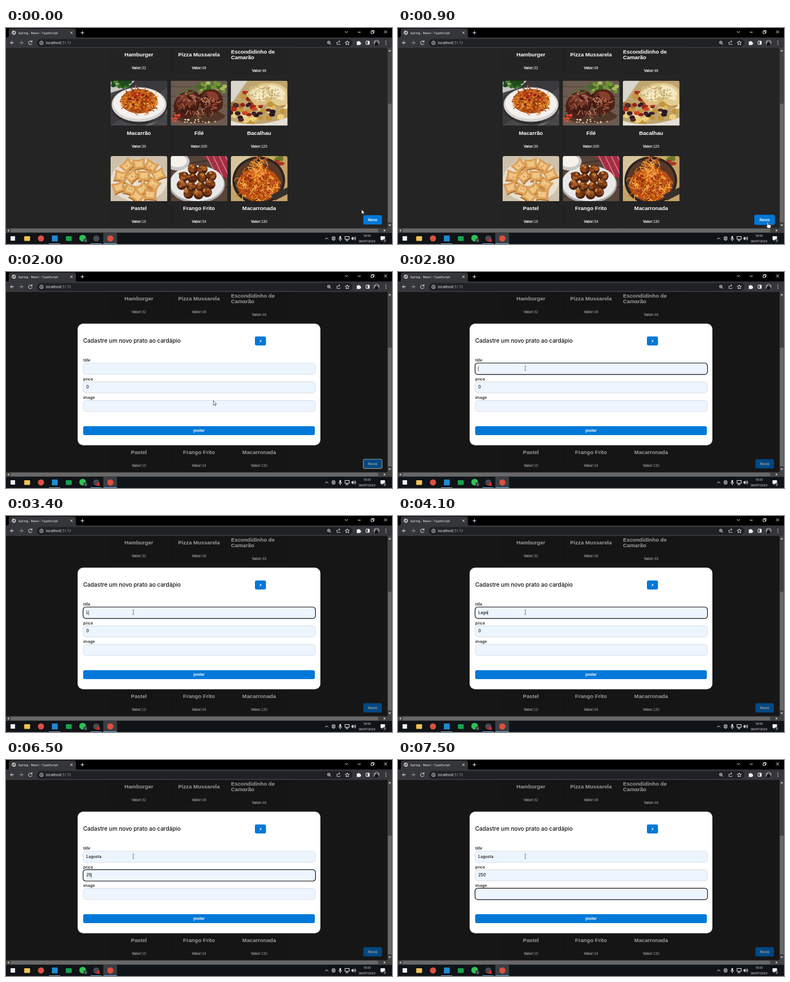
An HTML page for the animation above (8 s loop, 690 px wide and 388 px high).

```html
<!DOCTYPE html>
<html lang="pt-BR">
<head>
<meta charset="utf-8">
<title>Cardápio</title>
<style>
  html, body { margin: 0; width: 100%; height: 100%; overflow: hidden; background: #242424; }
  svg { display: block; width: 100%; height: 100%; }
  text { font-family: "Liberation Sans", Arial, sans-serif; white-space: pre; }
  .ui { font-family: "Open Sans", "Noto Sans", sans-serif; font-weight: 500; }
  .form { font-family: Inter, sans-serif; font-weight: 500; fill: #111; }
  .bold { font-weight: 700; }
  .line { fill: none; stroke: #ececee; stroke-width: 1; }
</style>
</head>
<body>
<svg id="stage" viewBox="0 0 690 388"></svg>
<script>
const LOOP = 8000, STEP = 100;
const BLUE = '#0078d9';

// --- markup helpers ---
const rect = (x, y, w, h, fill, r = 0, more = '') =>
  `<rect x="${x}" y="${y}" width="${w}" height="${h}" rx="${r}" fill="${fill}" ${more}/>`;
const oval = (x, y, rx, ry, fill, more = '') =>
  `<ellipse cx="${x}" cy="${y}" rx="${rx}" ry="${ry}" fill="${fill}" ${more}/>`;
const dot = (x, y, r, fill, more) => oval(x, y, r, r, fill, more);
const path = (d, fill, more = '') => `<path d="${d}" fill="${fill}" ${more}/>`;
const line = (d, more = '') => `<path class="line" d="${d}" ${more}/>`;
const text = (x, y, size, str, more = '') =>
  `<text x="${x}" y="${y}" font-size="${size}" ${more}>${str}</text>`;
const group = (id, body, more = '') => `<g id="${id}" ${more}>${body}</g>`;
const MID = 'text-anchor="middle"';

// --- food pictures, 101.5 x 81 each ---
function seeded(seed) {
  return () => (seed = (seed * 16807) % 2147483647) / 2147483647;
}
function scatter(seed, count, [cx, cy, rx, ry], draw) {
  const rnd = seeded(seed * 7919 + 13);
  let out = '';
  for (let i = 0; i < count; i++) {
    const a = rnd() * Math.PI * 2, d = Math.sqrt(rnd());
    out += draw(cx + Math.cos(a) * rx * d, cy + Math.sin(a) * ry * d, rnd);
  }
  return out;
}
const pick = (list, rnd) => list[Math.floor(rnd() * list.length)];
const n1 = v => v.toFixed(1);
const blobs = (seed, count, area, size, colors) => scatter(seed, count, area, (x, y, rnd) =>
  oval(n1(x), n1(y), n1(size * (.75 + rnd() * .5)), n1(size * (.6 + rnd() * .4)), pick(colors, rnd)));
const noodles = (seed, count, area, colors) => scatter(seed, count, area, (x, y, rnd) => {
  const v = () => n1(rnd() * 20 - 10);
  return path(`M${n1(x)} ${n1(y)}q${v()} ${v()} ${v()} ${v()}`, 'none',
    `stroke="${pick(colors, rnd)}" stroke-width="1.5" stroke-linecap="round"`);
});
const PASTA = ['#d8761f', '#e99a3b', '#a8440f', '#f0b45c', '#c95e1b', '#84300c'];
const nugget = (x, y, i) => dot(x + 1, y + 2, 9, '#4a2210') +
  blobs(40 + i, 9, [x, y, 6, 5], 4, ['#7d3d16', '#92491a', '#a55a23', '#683012']) +
  blobs(60 + i, 4, [x - 1, y - 3, 5, 3], 2, ['#c5803f', '#b56d2f']);
const pastry = (x, y, i) => `<g transform="translate(${x} ${y}) rotate(${i * 37 % 90 - 40})">` +
  path('M-12-9Q0-6 11-11Q9 0 13 10Q0 8-10 12Q-9 1-12-9Z', '#a8682c') +
  path('M-12-10Q0-7 11-12Q9-1 12 8Q0 6-10 10Q-9 0-12-10Z', '#dca056') +
  path('M-8-6Q0-4 7-7Q6 0 7 4Q0 3-6 5Z', '#efc684') + '</g>';

const photos = {
  macarrao: () => rect(0, 0, 102, 81, '#48474a') +
    path('M0 30L40 0H102V12L0 81Z', '#3a393c') + path('M62 81L102 50V58L72 81Z', '#6b6865') +
    path('M0 0H44L30 13 0 22Z', '#c9c9c6') +
    blobs(3, 26, [19, 5, 18, 7], 4, ['#2f6b25', '#4d8a2f', '#1e4a1c']) +
    oval(52, 47, 50, 32, '#1e1d20', 'opacity=".6"') + oval(51, 43, 49, 31, '#d5d3d2') +
    oval(51, 41, 46, 28, '#f3f0ed') + oval(51, 37, 33, 22, '#b5531a') +
    noodles(5, 190, [51, 36, 31, 20], PASTA) + blobs(8, 19, [52, 32, 20, 13], 2.5, ['#a51f10', '#c5361b', '#7c1f0d']),

  file: () => rect(0, 0, 102, 81, '#6b5b50') +
    [10, 27, 44, 61].map(y => rect(0, y, 102, 2, '#5d4b40')).join('') +
    blobs(4, 38, [73, 14, 25, 12], 4, ['#6d9234', '#8fab46', '#40661f', '#a6b85d']) +
    oval(50, 64, 47, 12, '#503628') +
    path('M5 45Q10 22 34 17Q48 16 52 32Q54 60 30 70Q7 68 5 45Z', '#4a2018') +
    path('M10 40Q18 21 36 20Q48 25 46 37Q37 50 13 52Z', '#7c3a2a') +
    path('M49 28Q62 12 82 17Q98 28 92 49Q75 63 58 58Z', '#4f2219') +
    path('M54 28Q67 15 81 22Q91 33 84 43Q67 50 57 45Z', '#85402d') +
    noodles(9, 85, [48, 42, 38, 20], ['#31130e', '#6b2d20', '#ac674d', '#4a1a12', '#c28467']) +
    path('M15 24Q38 13 53 5M31 24Q49 15 71 9', 'none', 'stroke="#4d702f" stroke-width="2"') +
    blobs(2, 8, [10, 68, 9, 7], 2.5, ['#c21f1b', '#e44a2f']) +
    blobs(7, 20, [48, 73, 40, 4], 1.5, ['#cfb17c', '#a31d17', '#e5d6b8']),

  bacalhau: () => rect(0, 0, 102, 81, '#bea571') +
    path('M0 0H30L8 32 0 43Z', '#d9d6ce') +
    blobs(2, 55, [51, 50, 51, 28], 6, ['#dfb962', '#edcf7d', '#c3943e', '#aa6e27', '#efe0b5']) +
    blobs(6, 17, [40, 54, 43, 22], 4.5, ['#381f29', '#4d2930', '#271b20']) +
    blobs(12, 14, [30, 40, 30, 25], 4.5, ['#b32a19', '#d04623', '#962018']) +
    path('M27 25Q42 5 65 4L75 33Q59 48 42 43Z', '#dcc384') + path('M31 24Q47 10 63 8L68 28 46 37Z', '#f3e3bb') +
    path('M62 6Q84 0 100 16L101 42Q84 51 73 37Z', '#e3cd94') + path('M67 8Q88 7 97 22L94 36 77 31Z', '#f5e8c3') +
    noodles(16, 28, [63, 24, 31, 14], ['#ddc792', '#fff4d7', '#c7a968']) +
    blobs(15, 24, [57, 22, 30, 15], 1, ['#66782e', '#93904e']) +
    path('M0 72Q45 87 102 66V81H0Z', '#e5e0d8'),

  pastel: () => rect(0, 0, 102, 81, '#cfc2ad') + oval(51, 44, 50, 39, '#e8dfcf') +
    [[30, 18], [51, 15], [72, 19], [86, 34], [18, 37], [39, 37], [60, 36], [76, 51], [15, 57], [35, 61], [57, 60], [71, 70], [47, 73]]
      .map(([x, y], i) => pastry(x, y, i)).join('') +
    blobs(31, 45, [51, 43, 37, 32], 1.2, ['#f4d59b', '#bc7935', '#cf8c40']),

  frango: () => rect(0, 0, 102, 81, '#594439') +
    [18, 36, 54, 72].map(y => path(`M0 ${y}L102 ${y - 17}v2L0 ${y + 2}Z`, '#3e3029')).join('') +
    path('M58 0H102V40Q83 37 72 14Z', '#a72d43') +
    [65, 76, 87, 98].map(x => path(`M${x} 0l17 36`, 'none', 'stroke="#ce8e9a" stroke-width="1.5"')).join('') +
    oval(47, 51, 50, 34, '#aaa8aa') + oval(47, 49, 48, 32, '#e9e8e8') +
    oval(12, 10, 22, 16, '#c9c7c5') + oval(12, 9, 17, 11, '#f6f2eb') +
    [[39, 22], [56, 22], [23, 35], [72, 34], [38, 38], [55, 37], [19, 50], [70, 49], [36, 54], [53, 53], [31, 66], [49, 67], [64, 63]]
      .map(([x, y], i) => nugget(x, y, i)).join(''),

  macarronada: () => rect(0, 0, 102, 81, '#c5a368') + path('M0 0H35L12 38 0 55Z', '#d9c59c') +
    blobs(4, 9, [85, 9, 17, 10], 5, ['#6d7728', '#c9b155', '#ac3720']) +
    oval(50, 44, 47, 43, '#282320') + oval(50, 44, 43, 39, '#5b3827') + oval(50, 51, 38, 30, '#b74910') +
    noodles(14, 190, [49, 53, 37, 28], [...PASTA, '#f4a12f']) +
    blobs(19, 16, [48, 56, 31, 22], 2, ['#a92910', '#c93c15']) +
    path('M47 0H55L54 20Q48 25 46 17Z', '#35251e') +
    noodles(23, 85, [49, 25, 13, 22], ['#f09334', '#d8661c', '#f4ab4b', '#a8410f']) +
    path('M72 70L102 56V68L79 80Z', '#36302c'),
};

// --- page ---
const columns = [237.5, 345, 452.5], rows = [-46.5, 94.5, 230];
const dishes = [
  ['Hamburger', 32], ['Pizza Mussarela', 48], ['Escondidinho de|Camarão', 48],
  ['Macarrão', 30, 'macarrao'], ['Filé', 100, 'file'], ['Bacalhau', 120, 'bacalhau'],
  ['Pastel', 10, 'pastel'], ['Frango Frito', 34, 'frango'], ['Macarronada', 130, 'macarronada'],
];
function card([name, price, photo], i) {
  const cx = columns[i % 3], left = cx - 50.7, top = rows[Math.floor(i / 3)];
  const [first, second] = name.split('|');
  const title = second
    ? text(left + .5, top + 92.5, 9.7, first, 'class="bold"') + text(left + .5, top + 102, 9.7, second, 'class="bold"')
    : text(cx, top + 97, 9.7, name, `class="bold" ${MID}`);
  return rect(left, top, 101.5, 128, '#232323', 4, 'stroke="#202020" stroke-opacity=".5" stroke-width="1.5"') +
    (photo ? `<g transform="translate(${left} ${top})" clip-path="url(#frame)"><g filter="url(#soft)">${photos[photo]()}</g></g>` : '') +
    title + text(cx, top + (second ? 125.3 : 120.3), 6.6, `<tspan class="bold">Valor:</tspan>${price}`, MID);
}
const page = rect(0, 36, 682, 324, '#242424') +
  `<g fill="#fff" clip-path="url(#view)">${dishes.map(card).join('')}</g>` +
  group('add', rect(-16.7, -8.3, 33.4, 16.6, BLUE, 3) +
    rect(-16.7, -8.3, 33.4, 16.6, 'none', 3, 'id="addRing" stroke="#fff" stroke-width="1.1"') +
    text(0, 2.4, 6.7, 'Novo', `class="bold" fill="#fff" ${MID}`));

// --- form ---
const fields = [['title', 163.8], ['price', 197.2], ['image', 230.6]];
const field = ([name, y]) =>
  text(138, y - 2.7, 7.18, name, 'class="form"') +
  rect(138, y, 415, 20, '#edf5fe', 5, 'stroke="#cfd5dc" stroke-width=".8"') +
  rect(137.7, y - .3, 415.6, 20.6, 'none', 5, `id="ring-${name}" stroke="#15171c" stroke-width="1.2"`) +
  (name === 'price' ? rect(143, 202, 5, 10, '#2a7be0', 0, 'id="selection"') : '') +
  text(143.4, y + 12.2, 7.18, '', `id="value-${name}" class="form"`);
const modal = rect(0, 36, 682, 324, '#000', 0, 'opacity=".4"') +
  rect(128, 92.8, 434, 218.4, '#fff', 10) +
  text(138, 127.4, 10.05, 'Cadastre um novo prato ao cardápio', 'class="form"') +
  rect(445, 115.8, 19.7, 16.2, BLUE, 3) + text(455, 126, 6.5, 'x', `class="bold" fill="#fff" ${MID}`) +
  fields.map(field).join('') +
  rect(138, 277, 414, 16, BLUE, 3) + text(345, 287.2, 6.5, 'postar', `class="bold" fill="#fff" ${MID}`) +
  rect(0, 0, .7, 8.5, '#222', 0, 'id="caret"');

// --- browser and desktop ---
const browser = rect(0, 0, 690, 18, '#000') + rect(0, 17, 690, 19, '#35363a') +
  path('M1 18Q5 18 5 14V5Q5 1 9 1H121Q125 1 125 5V14Q125 18 129 18Z', '#35363a') +
  dot(14, 8.5, 3.3, 'none', 'class="line"') + line('M11 8q3-1 3 2t3-3M12 6l2 1 1-2') +
  text(22, 10.8, 5.87, 'Spring - React - TypeScript', 'class="ui" fill="#fff"') +
  line('M115 6.5l4 4m0-4l-4 4M136.5 5.5v6m-3-3h6') +
  line('M606 6l2.5 2.5L611 6M629 7.5h5M652.5 6h4v4h-4ZM654 6V4.5h4v4h-1.5M676 4.5l5 5m0-5l-5 5') +
  line('M14 26.5H8m3-3l-3 3 3 3') + line('M24 26.5h6m-3-3l3 3-3 3', 'opacity=".6"') +
  line('M46 24.5A3.2 3.2 0 1 0 46.5 27.5M46.5 22.5v2.5h-2.5') +
  rect(55, 19.7, 564, 14, '#202124', 7) + dot(63.5, 26.7, 3, 'none', 'class="line"') + line('M63.5 26.2v2.2m0-3.7v.8') +
  text(71.3, 29, 6.64, 'localhost<tspan fill="#9aa0a6">:5173</tspan>', 'class="ui" fill="#fff"') +
  dot(577, 26, 2.3, 'none', 'class="line"') + line('M578.7 27.7l2 2M576 26h2') +
  line('M591.5 25v4.5h5.5V28M592.5 27q0-3 4-3m-1.5-1.8l2 1.8-2 1.8', 'opacity=".75"') +
  line('M610 23l1.1 2.4 2.6.3-1.9 1.8.5 2.6-2.3-1.3-2.3 1.3.5-2.6-1.9-1.8 2.6-.3Z') +
  path('M627 24.5h2a1.3 1.3 0 1 1 2.6 0h2v2a1.3 1.3 0 1 1 0 2.6v1.4h-6.600Z', '#f0f0f0') +
  rect(643.5, 23.5, 6, 6, 'none', .5, 'class="line"') + rect(646.5, 23.5, 3, 6, '#eee') +
  dot(662.5, 26.5, 5.2, '#8d8b8a') + path('M659 31q0-6 3.5-6t3.500 6q-3.500 1.500-7 0Z', '#121318') + dot(662.5, 24, 1.8, '#5e483d') +
  [23.5, 26.5, 29.5].map(y => dot(679, y, .8, '#e8e8e8')).join('');

const scrollbars = rect(682, 36, 8, 324, '#424242') + rect(682.7, 136, 6.6, 213, '#686868') +
  path('M683.5 42h5l-2.5-3ZM683.5 353h5l-2.5 3Z', '#c4c4c4') +
  rect(0, 359.6, 690, 8.4, '#424242') + rect(8.5, 360.4, 656.5, 6.6, '#686868') +
  path('M5.5 361.3v5l-3-2.5ZM675.5 361.3v5l3-2.5Z', '#c4c4c4');

const taskbar = rect(0, 368, 690, 20, '#101317') + rect(174, 368, 24.5, 20, '#3b3e42') +
  rect(8.2, 374, 8, 8, '#f3f3f3') + rect(32.5, 374, 10.5, 8.5, '#f2c14e', 1) +
  dot(62.5, 378, 5.5, '#dd5142') + rect(82, 372.8, 10.5, 10.5, '#1f8ad2', 1) +
  rect(107, 374, 10.5, 8.5, '#16a34f', 1) + dot(137, 377.5, 6, '#2bc456') +
  dot(142, 381.5, 3.6, '#3b3e42') + text(142, 383.5, 5.5, '1', `class="ui" fill="#fff" ${MID}`) +
  dot(161.5, 378, 5.5, '#4a494d') + dot(165, 381.5, 3, '#ee1c24', 'id="recording"') +
  dot(186.5, 378, 5.5, '#dd5142') +
  rect(77, 387, 20, 1, '#76b9ed') + rect(151, 387, 20, 1, '#76b9ed') + rect(174, 387, 24.5, 1, '#76b9ed') +
  line('M570.5 379.5l2.7-2.7 2.7 2.7') + rect(583, 375, 5, 6, 'none', 1, 'class="line"') + line('M584 377h3m-3 2h3') +
  rect(596, 373.8, 3, 5, '#eee', 1.5) + line('M595 378q0 2.5 2.5 2.5t2.5-2.5m-2.5 2.5v2') +
  rect(606, 374.5, 7.5, 5, 'none', 0, 'class="line"') + line('M607 382h5m-2.5-2v2') +
  path('M617.5 376.5h1.5l2-2v7l-2-2h-1.5Z', '#eee') + line('M622.5 376q1.3 2 0 4m1.5-5.5q2.2 3.5 0 7') +
  text(645.3, 375.3, 5.4, '16:53', `class="ui" fill="#fff" ${MID}`) +
  text(645.3, 384.5, 5.6, '06/07/2023', `class="ui" fill="#fff" ${MID}`) +
  path('M669.5 374h8v6.5h-4l-2 2v-2h-2Z', '#f1f1f1') + dot(677, 382, 3, '#34373b') +
  text(677, 383.7, 4.5, '3', `class="ui" fill="#fff" ${MID}`);

const OUTLINE = 'stroke="#111" stroke-width=".6" stroke-linejoin="round"';
const pointers =
  group('arrow', path('M0 0V8.2L1.9 6.5 3.2 9.3 4.5 8.7 3.2 6H5.8Z', '#fff', OUTLINE)) +
  group('hand', path('M-1 .7Q0-.7 1 .7V4.2L5 5.2Q6 5.7 5.8 7L5 11H0L-3 7.2Q-3 5.8-1 7Z', '#fff', OUTLINE) +
    path('M1 4v2m2-1.5v2', 'none', 'stroke="#333" stroke-width=".4"')) +
  group('beam', path('M-1.7-4q1.7 0 1.7 1v6q0 1-1.7 1M1.7-4q-1.7 0-1.7 1m0 6q0 1 1.7 1', 'none',
    'stroke="#555" stroke-width=".7"'));

const stage = document.getElementById('stage');
stage.innerHTML = `<defs>
    <clipPath id="frame"><path d="M0 81V4Q0 0 4 0H97.5Q101.5 0 101.5 4V81Z"/></clipPath>
    <clipPath id="view"><rect y="36" width="682" height="324"/></clipPath>
    <filter id="soft"><feGaussianBlur stdDeviation=".45"/></filter>
  </defs>` + page + group('modal', modal) + scrollbars + browser + taskbar + pointers;

// --- timeline ---
const $ = id => document.getElementById(id);
const CLICK_ADD = 1100, FOCUS = [2700, 5000, 7000];
const titleKeys = [3400, 3600, 3800, 4100, 4200, 4400, 4700];
const priceKeys = [6000, 6500, 6700];
const pointerStops = [[0, 635.5, 326], [600, 660, 347.5], [900, 661, 348.5], [1200, 661, 348.5], [2500, 227.5, 173]];

const show = (id, on) => $(id).setAttribute('visibility', on ? 'inherit' : 'hidden');
const typed = (word, keys, t) => word.slice(0, keys.filter(k => k <= t).length);
const ramp = (t, from, to) => Math.min(1, Math.max(0, (t - from) / (to - from)));

function pointerAt(t) {
  let [, x, y] = pointerStops[0];
  for (let i = 1; i < pointerStops.length; i++) {
    const [end, nx, ny] = pointerStops[i], k = ramp(t, pointerStops[i - 1][0], end);
    const e = k * k * (3 - 2 * k);
    x += (nx - x) * e;
    y += (ny - y) * e;
  }
  return [x, y];
}

function render(t) {
  const open = t >= CLICK_ADD;
  const focus = FOCUS.filter(f => f <= t).length - 1;
  const [x, y] = pointerAt(t);
  const kind = y < 184 && open ? 'beam' : !open && t >= 400 ? 'hand' : 'arrow';
  for (const id of ['arrow', 'hand', 'beam']) show(id, id === kind);
  $(kind).setAttribute('transform', `translate(${x} ${y})`);

  const hover = ramp(t, 300, 600) - ramp(t, 1000, 1400);
  $('add').setAttribute('transform', `translate(655.4 344.6) scale(${1 + hover * .1})`);
  show('addRing', open && focus < 0);
  show('recording', t >= 200);
  show('modal', open);

  const selecting = t >= FOCUS[1] && t < priceKeys[0];
  const values = [typed('Lagosta', titleKeys, t), typed('250', priceKeys, t) || '0', ''];
  fields.forEach(([name], i) => {
    show('ring-' + name, open && i === focus);
    $('value-' + name).textContent = values[i];
  });
  show('selection', open && selecting);
  $('value-price').style.fill = selecting ? '#fff' : '';

  // The caret restarts its blink at every key and focus change.
  const lastInput = Math.max(0, ...[...FOCUS, ...titleKeys, ...priceKeys].filter(k => k <= t));
  show('caret', focus >= 0 && !selecting && (t - lastInput) % 1000 < 500);
  if (focus >= 0) {
    const [name, top] = fields[focus];
    const width = values[focus] ? $('value-' + name).getComputedTextLength() : 0;
    $('caret').setAttribute('transform', `translate(${143.4 + width} ${top + 5.8})`);
  }
}

const start = performance.now();
function tick() {
  const t = (performance.now() - start) % LOOP;
  render(Math.floor(t / STEP) * STEP);
  requestAnimationFrame(tick);
}
tick();
</script>
</body>
</html>
```
